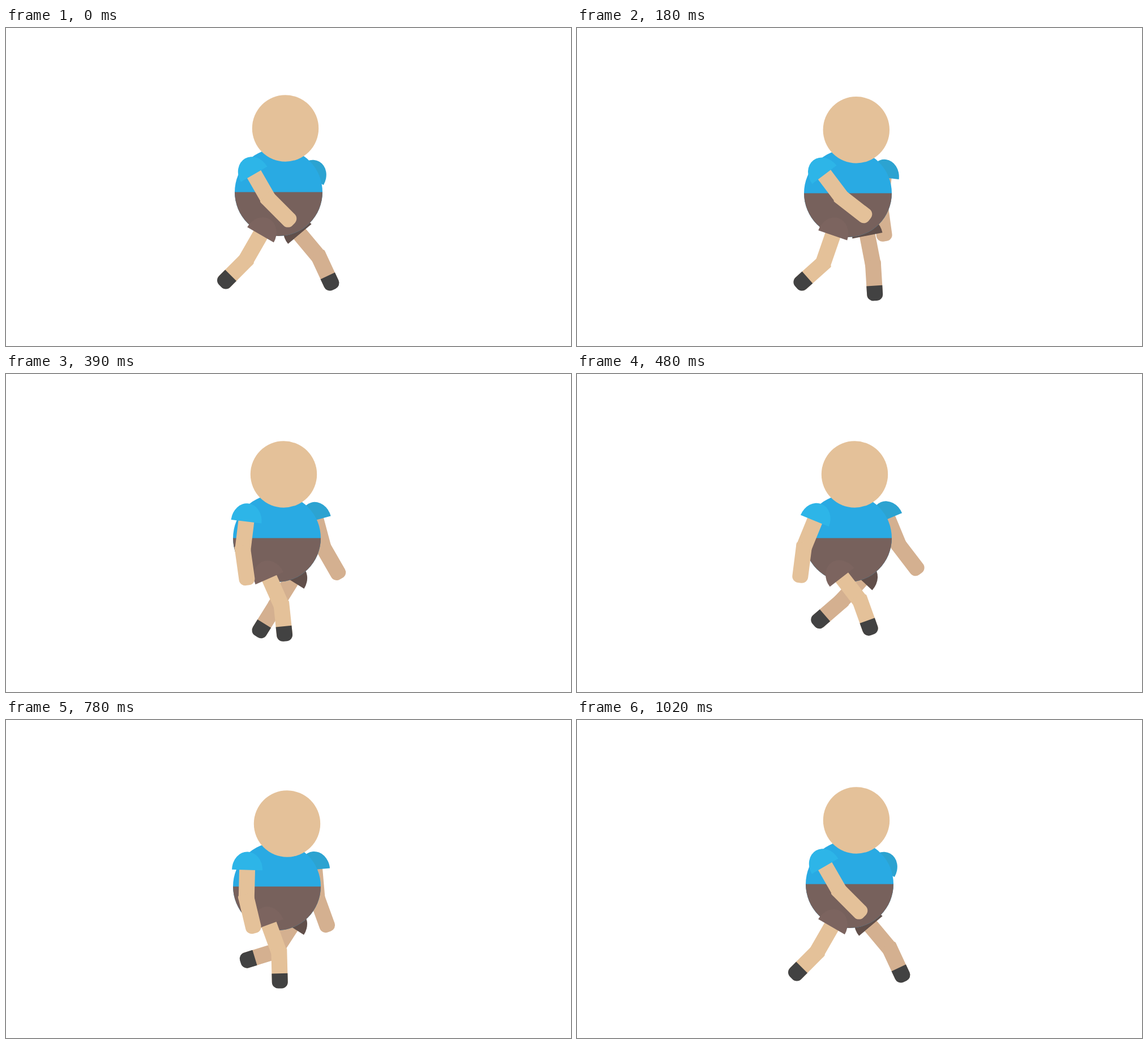
Write an HTML page that moves like this. It is 998 px wide and 561 px high and loops after 1050 ms.

```html
<!DOCTYPE html>
<html lang="en">
<head>
<meta charset="utf-8">
<title>Walk cycle</title>
<style>
  html, body { margin: 0; width: 100%; height: 100%; overflow: hidden; background: #fff; }
  svg { display: block; width: 998px; height: 561px; }
</style>
</head>
<body>
<svg id="stage" viewBox="0 0 998 561"></svg>
<script>
const LOOP = 1050, STEP = 30;
const SKIN = '#e4c199', FAR_SKIN = '#d4b090', SHOE = '#424242';
const stage = document.getElementById('stage');

function add(parent, tag, attrs = {}) {
  const el = document.createElementNS('http://www.w3.org/2000/svg', tag);
  for (const k in attrs) el.setAttribute(k, attrs[k]);
  parent.append(el);
  return el;
}

// Smooth curve through [time, value] pairs that never overshoots them.
function track(...keys) {
  const slope = i => (keys[i + 1][1] - keys[i][1]) / (keys[i + 1][0] - keys[i][0]);
  const tangent = i => {
    if (i === 0) return slope(0);
    if (i === keys.length - 1) return slope(i - 1);
    const a = slope(i - 1), b = slope(i);
    return a * b > 0 ? 2 * a * b / (a + b) : 0;
  };
  return t => {
    let i = 0;
    while (i < keys.length - 2 && t > keys[i + 1][0]) i++;
    const [t0, v0] = keys[i], [t1, v1] = keys[i + 1];
    const d = t1 - t0, u = Math.min(1, (t - t0) / d), w = 1 - u;
    return v0 * (1 + 2 * u) * w * w + v1 * u * u * (3 - 2 * u)
      + d * u * w * (tangent(i) * w - tangent(i + 1) * u);
  };
}

// Two-part limb: (x, y) is the pivot, (ax, ay) the cuff centre relative to it.
function limb({ x, y, ax, ay, upper, skin, cuff, shoe }) {
  const root = add(stage, 'g');
  const arm = add(root, 'g', { transform: `translate(${ax} ${ay})` });
  add(arm, 'rect', { x: -14, y: -10, width: 28, height: upper + 12, fill: skin });
  const lower = add(arm, 'g');
  add(lower, 'path', {
    d: 'M-11-8H11a3 3 0 0 1 3 3V52a11 11 0 0 1-11 11H-3a11 11 0 0 1-11-11V-5a3 3 0 0 1 3-3Z',
    fill: skin
  });
  if (shoe) add(lower, 'path', { d: 'M-14 37H14V52.5a11 11 0 0 1-11 11H-3a11 11 0 0 1-11-11Z', fill: SHOE });
  add(arm, 'path', { d: 'M-27 0A27 32 0 0 1 27 0Z', fill: cuff });
  return (dx, dy, turn, bend) => {
    root.setAttribute('transform', `translate(${x + dx} ${y + dy}) rotate(${turn})`);
    lower.setAttribute('transform', `translate(0 ${upper}) rotate(${bend})`);
  };
}

const farArm = limb({ x: 533.8, y: 244.7, ax: 10, ay: 16, upper: 50.5, skin: FAR_SKIN, cuff: '#2ca3d1' });
const farLeg = limb({ x: 510.5, y: 353.5, ax: 0, ay: 13, upper: 52.5, skin: FAR_SKIN, cuff: '#614f4a', shoe: true });

const torso = add(stage, 'g');
add(torso, 'circle', { r: 77.5, fill: '#29aae3' });
add(torso, 'path', { d: 'M-77.5 0A77.5 77.5 0 0 0 77.5 0Z', fill: '#77615c' });

const nearLeg = limb({ x: 456, y: 353.5, ax: 0, ay: 13, upper: 52.5, skin: SKIN, cuff: '#7c645f', shoe: true });
const head = add(stage, 'circle', { r: 58.7, fill: SKIN });
const nearArm = limb({ x: 426.5, y: 243, ax: 0, ay: 17.3, upper: 50.5, skin: SKIN, cuff: '#2db5e8' });

const bob = track([0, 0], [90, 8], [240, 0], [540, 0], [600, 2], [720, 8], [780, 6], [900, 0], [1020, 0]);
const sway = track([0, 3], [90, 0.5], [180, 0], [900, 0], [1020, 3]);
const hipLift = track([0, 0], [270, 0], [390, 1], [850, 1], [1020, 0]);

const nearArmTurn = track([0, -30], [90, -41], [120, -42], [270, -21], [390, 7], [540, 30], [570, 32.5], [600, 28], [780, 1.5], [1020, -30]);
const farArmTurn = track([0, 30], [90, 25], [270, -10], [390, -15], [540, -29], [570, -33], [600, -29], [780, -5], [1020, 30]);
const nearThigh = track([0, 30], [90, 30], [270, 0], [390, -24], [560, -44], [600, -42.5], [780, -20], [1020, 30]);
const nearKnee = track([0, 15], [90, 27], [270, 30], [390, 18], [780, 18.5], [1020, 15]);
const farThigh = track([0, -40], [90, -21.4], [270, 0], [390, 32], [560, 47], [600, 46.5], [780, 33], [1020, -40]);
const farKnee = track([0, 15], [90, 15], [270, 0], [390, 0], [600, 22], [780, 40], [1020, 15]);

function draw(t) {
  const b = bob(t), s = sway(t), drop = b * 0.69, lift = hipLift(t);
  torso.setAttribute('transform', `translate(${478.5 + s} ${289.5 + drop})`);
  head.setAttribute('cx', 490.5 + s + b);
  head.setAttribute('cy', 177 + b);
  farArm(s, drop, farArmTurn(t), -15);
  nearArm(s, drop, nearArmTurn(t), -15);
  farLeg(0, 0, farThigh(t), farKnee(t));
  nearLeg(4 * lift, -5 * lift, nearThigh(t), nearKnee(t));
}

function tick() {
  draw(Math.floor(performance.now() % LOOP / STEP) * STEP);
  requestAnimationFrame(tick);
}
tick();
</script>
</body>
</html>
```
